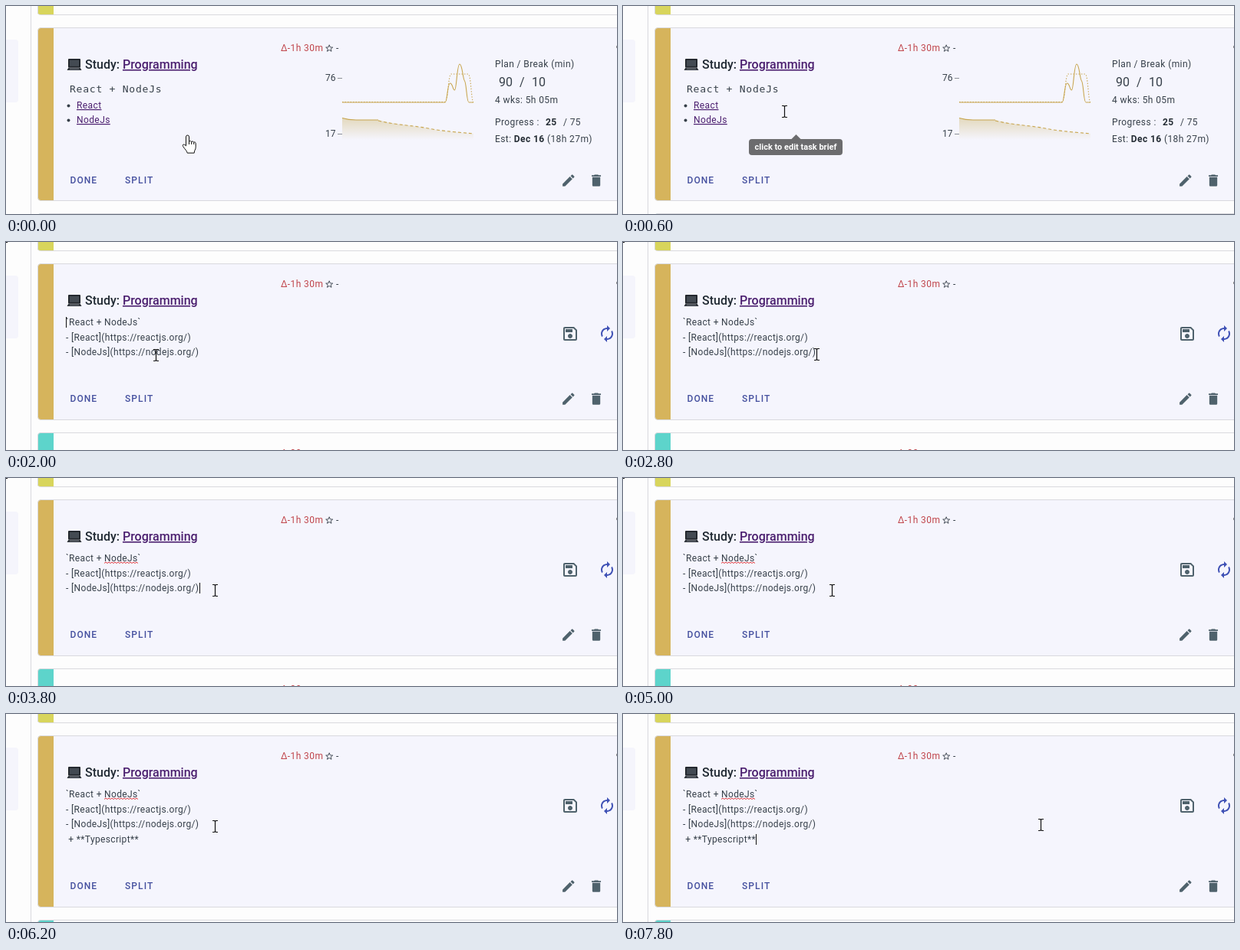
These frames come from a looping animation (796 px wide and 272 px high, 8000 ms). An HTML page:

```html
<!DOCTYPE html>
<html lang="en">
<head>
<meta charset="utf-8">
<title>Task card</title>
<style>
  html, body { margin: 0; width: 100%; height: 100%; overflow: hidden; background: #fdfdfd; }
  svg { display: block; width: 796px; height: 272px; }
  text { font: 12px Roboto, sans-serif; letter-spacing: .4px; fill: #37404a; white-space: pre; }
  .title { font-size: 16px; font-weight: 500; letter-spacing: 0; fill: #212a33; }
  .link { fill: #4b1f6f; text-decoration: underline; }
  .big { font-size: 16px; letter-spacing: 0; }
  .late { fill: #c0454b; }
  .code { font: 13px "DejaVu Sans Mono", monospace; letter-spacing: .77px; }
  .btn { font-weight: 500; letter-spacing: 1.07px; fill: #45509f; }
  .tip { font-size: 11px; font-weight: 700; letter-spacing: 0; fill: #fff; text-anchor: middle; }
  .edit text { letter-spacing: .35px; }
  .b { font-weight: 700; fill: #252d35; }
  .icon { fill: #4f626c; }
  .gold { fill: none; stroke: #c8a650; stroke-width: 1.1; }
  .edge { fill: none; stroke: #d9d9de; }
</style>
</head>
<body>
<svg viewBox="0 0 796 272">
  <rect width="796" height="272" fill="#fdfdfd"/>
  <path d="M0 44H12a4 4 0 0 1 4 4V122a4 4 0 0 1-4 4H0z" fill="#f5f5fc"/>
  <path class="edge" d="M32.5 0V272"/>
  <path d="M41 0H62V11H44a3 3 0 0 1-3-3z" fill="#d8d55c"/>
  <path class="edge" d="M41.5 0V8a3 3 0 0 0 3 3.5H796"/>
  <rect id="dot" width="2" height="1" fill="#000"/>

  <rect id="card" x="41.5" y="28.5" width="770" height="226" rx="4" fill="#f5f5fd"/>
  <path id="bar" fill="#d6b45c"/>
  <rect id="rim" class="edge" x="41.5" y="28.5" width="770" height="226" rx="4"/>
  <rect x="795" y="52" width="1" height="3" fill="#8a8a90"/>

  <g id="next">
    <path d="M62 271.5H45a3.5 3.5 0 0 0-3.5 3.5V310H62z" fill="#5dd4cb"/>
    <path class="edge" d="M41.5 310V275a3.5 3.5 0 0 1 3.5-3.5H796"/>
    <text class="late" x="358" y="302">Δ-30m</text>
  </g>

  <text class="late" x="358" y="59">Δ-1h 30m</text>
  <path d="M421.2 50.8l1.2 3.1 3.3.2-2.6 2 .9 3.2-2.8-1.8-2.8 1.8.9-3.2-2.6-2 3.3-.2z" fill="none" stroke="#37404a" stroke-width=".9"/>
  <text x="430" y="59">-</text>

  <g>
    <rect x="81" y="69" width="16" height="11.5" rx="1" fill="#20242a"/>
    <rect x="82.8" y="70.8" width="12.4" height="8" fill="#434a52"/>
    <path d="M81.5 80.5h15l2 3.5H79.500z" fill="#30353b"/>
    <path d="M83 82.200h12" stroke="#8d949b" stroke-width=".8"/>
  </g>
  <text class="title" x="103" y="82">Study: <tspan class="link">Programming</tspan></text>

  <g id="view">
    <text class="code" x="83" y="113">React + NodeJs</text>
    <circle cx="81.500" cy="130.500" r="2" fill="#37404a"/>
    <circle cx="81.500" cy="149.500" r="2" fill="#37404a"/>
    <text class="link" x="92" y="134">React</text>
    <text class="link" x="92" y="153">NodeJs</text>

    <defs>
      <linearGradient id="fade" x2="0" y2="1">
        <stop stop-color="#d8c796" stop-opacity=".62"/>
        <stop offset="1" stop-color="#d8c796" stop-opacity="0"/>
      </linearGradient>
    </defs>
    <text x="416" y="98" style="letter-spacing:0">76</text>
    <text x="416" y="171" style="letter-spacing:0">17</text>
    <path d="M432 94.500h6M432 167.500h6" stroke="#8b8f96"/>
    <path class="gold" d="M438 126H572C575 126 575 101 578.500 101S582 110 584.500 110 587.500 76 591 76 595 95 597.500 98 600 126 603 126H609"/>
    <path class="gold" stroke-dasharray="1.500 2" d="M438 125.500H572C576 125 576 89 580 89H602C606 89 606 125 609 126"/>
    <path d="M438 146.500Q446 149 456 149H485C510 156 530 156 550 160S590 165 609 167V175H438z" fill="url(#fade)"/>
    <path class="gold" d="M438 146.500Q446 149 456 149H485"/>
    <path class="gold" stroke-dasharray="4 3" d="M485 150C510 156 530 156 550 160S590 165 609 167"/>

    <text x="637" y="80">Plan / Break (min)</text>
    <text class="big" x="642" y="105">90</text>
    <text class="big" x="669" y="105">/</text>
    <text class="big" x="685" y="105">10</text>
    <text x="637" y="127">4 wks: 5h 05m</text>
    <text x="637" y="156">Progress :</text>
    <text class="b" x="703" y="156">25</text>
    <text x="726" y="156">/ 75</text>
    <text x="637" y="178">Est: <tspan class="b">Dec 16</tspan> (18h 27m)</text>
  </g>

  <g id="edit" class="edit">
    <text x="78" y="109">`React + NodeJs`</text>
    <text x="78" y="129">- [React](https://reactjs.org/)</text>
    <text x="78" y="148">- [NodeJs](https://nodejs.org/)</text>
    <text x="78" y="168" id="typed"></text>
    <path id="wavy" fill="none" stroke="#e0393e"/>
    <path id="caret" d="M.5 0V14" stroke="#111"/>
    <path class="icon" transform="translate(723 108)" d="M17 3H5c-1.110 0-2 .9-2 2v14c0 1.100.89 2 2 2h14c1.100 0 2-.9 2-2V7l-4-4zm2 16H5V5h11.170L19 7.830V19zm-7-7c-1.660 0-3 1.340-3 3s1.340 3 3 3 3-1.340 3-3-1.340-3-3-3zM6 6h9v4H6z"/>
    <path fill="#3f51b5" transform="translate(771 108)" d="M12 6v3l4-4-4-4v3c-4.420 0-8 3.580-8 8 0 1.570.46 3.030 1.240 4.260L6.700 14.800c-.45-.83-.7-1.790-.7-2.800 0-3.310 2.690-6 6-6zm6.760 1.740L17.300 9.200c.44.84.7 1.790.7 2.800 0 3.310-2.690 6-6 6v-3l-4 4 4 4v-3c4.420 0 8-3.580 8-8 0-1.570-.46-3.030-1.240-4.260z"/>
  </g>

  <g id="actions">
    <text class="btn" x="83.500" y="232">DONE</text>
    <text class="btn" x="155" y="232">SPLIT</text>
    <path class="icon" transform="translate(722.500 217.800) scale(.86)" d="M3 17.250V21h3.750L17.810 9.940l-3.750-3.750L3 17.250zM20.710 7.040c.39-.39.39-1.020 0-1.410l-2.340-2.340c-.39-.39-1.020-.39-1.410 0l-1.830 1.830 3.750 3.750 1.830-1.830z"/>
    <path class="icon" transform="translate(758.700 217.800) scale(.86)" d="M6 19c0 1.100.9 2 2 2h8c1.100 0 2-.9 2-2V7H6v12zM19 4h-3.500l-1-1h-5l-1 1H5v2h14V4z"/>
  </g>

  <g id="tip">
    <path d="M219 174.500L225.500 168l6.500 6.500z" fill="#6c6c6e"/>
    <rect x="164" y="174" width="122" height="21" rx="4" fill="#6c6c6e"/>
    <text class="tip" x="225" y="188">click to edit task brief</text>
  </g>

  <path id="hand" fill="#fff" stroke="#111" stroke-linejoin="round" d="M-1.500 2a2 2 0 0 1 4 0v7c0-2 3.200-1.800 3.200 0 0-1.500 3-1.200 3 .7 0-1.300 2.500-1 2.500 1v5c0 3-2 4-2 7.500H.2c-.5-3-3-4.500-5.500-8.500-1.500-2.500 1-4 3.800-.8zM2.500 8v4M5.700 9v3M8.700 10v2"/>
  <path id="beam" fill="none" stroke="#111" stroke-width="1.200" d="M-3.500-7.500h2.500l1 1 1-1h2.500M0-6.500v13M-3.500 7.500h2.500l1-1 1 1h2.500"/>
</svg>
<script>
const LOOP = 8000;
const $ = id => document.getElementById(id);
const LINE = " + **Typescript**";
const TOP = [78, 98], END3 = [252, 137], START4 = [78, 157], END4 = [173, 157];

// Each step overrides only the values that change at that time.
const steps = [
  [0, { pointer: "hand", at: [236, 169], tip: 0, edit: false, caret: null, wavy: false, shift: 0, typed: 0, dot: false }],
  [200, { at: [228, 154] }],
  [400, { pointer: "beam", at: [216.5, 146], tip: .6 }],
  [600, { at: [210.5, 138], tip: 1 }],
  [800, { at: [206.5, 141] }],
  [1000, { at: [199.5, 146] }],
  [1200, { at: [195.5, 148] }],
  [1800, { dot: true }],
  [2000, { edit: true, tip: 0, shift: -22, caret: TOP }],
  [2600, { at: [214.5, 148], caret: null }],
  [2800, { at: [252.5, 147] }],
  [3000, { at: [272.5, 147], caret: TOP }],
  [3800, { caret: END3, wavy: true }],
  [4000, { caret: null }],
  [4600, { caret: END3 }],
  [5000, { caret: null }],
  [5200, { caret: START4, shift: -2 }],
  [5600, { typed: 8, caret: [114, 157], dot: false }],
  [5800, { typed: LINE.length, caret: END4 }],
  [6200, { caret: null }],
  [6800, { caret: END4 }],
  [7200, { at: [310.5, 147], caret: null }],
  [7400, { at: [415.5, 146] }],
  [7600, { at: [508.5, 145] }],
  [7800, { at: [544.5, 145], caret: END4 }]
];

const show = (id, on) => $(id).setAttribute("visibility", on ? "visible" : "hidden");
const move = (id, x, y) => $(id).setAttribute("transform", `translate(${x} ${y})`);

let wave = "M128 111.5";
for (let i = 0; i < 11; i++) wave += "l2-1.5 2 1.5";
$("wavy").setAttribute("d", wave);

function draw(t) {
  const s = Object.assign({}, ...steps.filter(([at]) => at <= t).map(([, v]) => v));
  show("dot", s.dot);
  show("view", !s.edit);
  show("edit", s.edit);
  show("wavy", s.edit && s.wavy);
  show("caret", s.caret);
  if (s.caret) move("caret", ...s.caret);
  $("typed").textContent = LINE.slice(0, s.typed);

  const bottom = 254.5 + s.shift;
  for (const id of ["card", "rim"]) $(id).setAttribute("height", bottom - 28.5);
  $("bar").setAttribute("d", `M62 28.5H45.5a4 4 0 0 0-4 4V${bottom - 4}a4 4 0 0 0 4 4H62z`);
  move("next", 0, s.shift);
  move("actions", 0, s.shift - (s.edit ? 1 : 0));

  $("tip").setAttribute("opacity", s.tip);
  for (const id of ["hand", "beam"]) show(id, id === s.pointer);
  move(s.pointer, ...s.at);
}

const start = performance.now();
function tick() {
  draw((performance.now() - start) % LOOP);
  requestAnimationFrame(tick);
}
tick();
</script>
</body>
</html>
```
